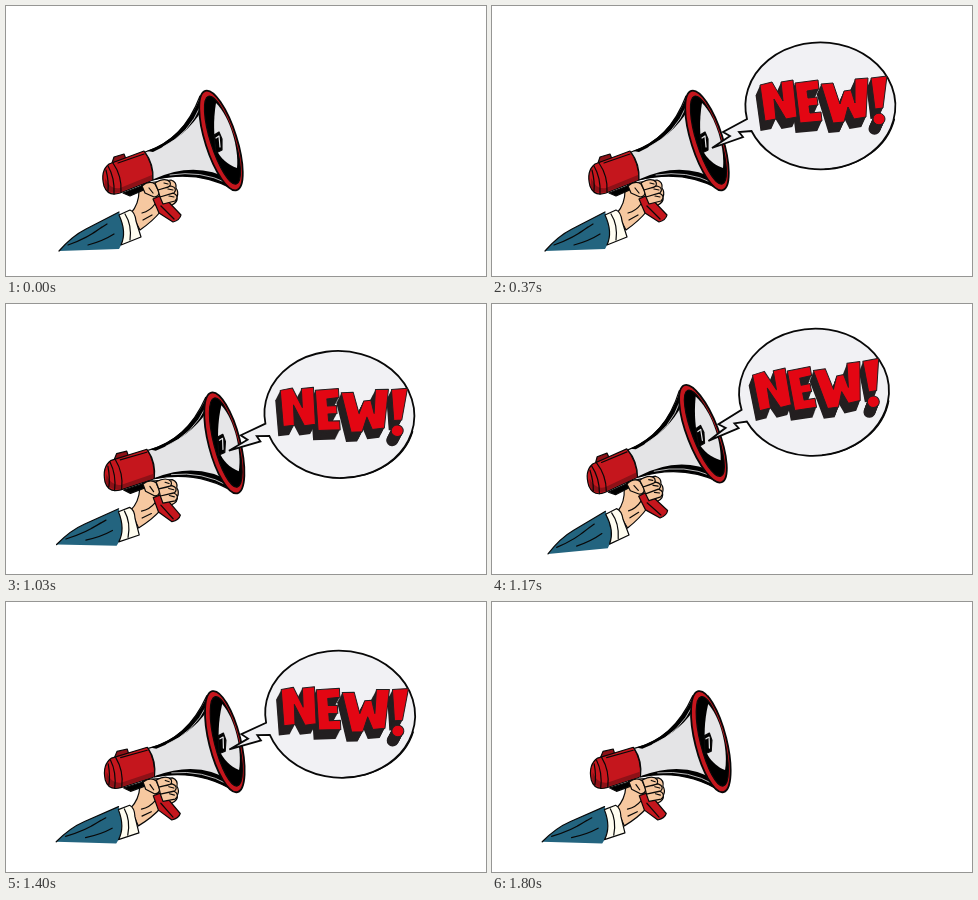
An HTML page for the animation above (1.83 s loop, 480 by 270 pixels).

```html
<!DOCTYPE html>
<html lang="en">
<head>
<meta charset="utf-8">
<title>New!</title>
<style>
  html, body { margin: 0; height: 100%; overflow: hidden; background: #fff; }
  svg { display: block; width: 100vw; height: 100vh; }
  .ink { stroke: #080808; stroke-width: 1.2; stroke-linejoin: round; stroke-linecap: round; }
  .line { fill: none; }
  .red { fill: #c5161d; }
  .dark { fill: #8d1117; }
  .skin { fill: #f6c8a0; }
</style>
</head>
<body>
<svg viewBox="0 0 480 270">
  <defs>
    <path id="word" d="M268 79L280 76 291 95 289 76 301 74 305 111 294 113 282 93 284 113 273 115Z
      M303 77L326 74 327 83 315 85 316 92 325 91 326 99 317 100 318 107 329 106 330 115 308 117Z
      M329 78L341 77 348 98 352 85 359 84 363 97 363 73 376 72 374 111 362 113 356 101 352 116 341 117Z
      M379 72L395 70 391 102 383 103Z M381 113a6 5.8 0 1 1 12 0a6 5.8 0 1 1-12 0Z"/>
  </defs>
  <g id="scene">
    <g class="ink">
      <path fill="#23647f" stroke="none" d="M53 245Q66 230 80 223L113 206 121 228 113 243Z"/>
      <path class="line" d="M53 245Q66 230 80 223L113 206M62 239Q82 232 96 221M82 239Q97 235 108 228M87 227L101 218"/>
      <path class="skin" d="M125 207Q133 198 133 185Q134 178 141 177L165 174Q171 176 170 182 173 186 171 191 172 196 166 199L155 205Q147 215 134 224Z"/>
      <path fill="#fffdf0" d="M113 209L124 204Q129 206 130 215L135 231 115 239Q121 226 113 209Z"/>
      <path class="line" d="M119 208Q126 219 124 234M136 207Q144 205 149 198M137 214L146 209"/>
    </g>
    <g class="ink">
      <path class="red" d="M147 193L156 189 175 209Q174 214 167 216L153 207Z"/>
      <path class="line" d="M155 200L168 213"/>
      <path d="M117 187L138 179 140 183 124 190Z"/>
      <path class="dark" d="M106 157L108 151 118 148 120 153Z"/>
      <path class="red" d="M103 158L138 145Q147 157 147 174L114 187Q102 191 98 180 94 165 103 158Z"/>
      <path class="dark" stroke="none" d="M99 172Q104 184 114 182L146 169 146 174 114 186Q102 189 99 180Z"/>
      <path class="line" d="M102 160Q109 172 108 188M107 157Q116 170 115 186M100 164Q103 176 102 185M112 157L138 148"/>
      <path fill="#e4e4e6" d="M139 146Q177 135 194 90L229 184Q191 163 147 174Q148 158 139 146Z"/>
      <path stroke="none" d="M141 145Q177 132 194 92L196 104Q181 130 147 146ZM148 173Q190 154 225 174L229 184Q191 163 148 174Z"/>
      <path class="line" style="stroke:#e4e4e6;stroke-width:.8" d="M157 141Q183 128 195 99M164 169Q195 164 221 177"/>
      <g transform="rotate(-17.6 215 134.5)">
        <ellipse class="red" cx="215" cy="134.5" rx="15.8" ry="52" style="stroke-width:1.8"/>
        <ellipse cx="216.5" cy="134.5" rx="12" ry="46"/>
      </g>
      <path fill="#e6e6e8" stroke="none" d="M210 97C224 111 233 142 231 162C222 159 214 152 210 143C208 130 207 115 210 97Z"/>
      <path d="M208 129L213 126 216 133 216 144 210 147Z"/>
      <path class="line" style="stroke:#e6e6e8" d="M210 132L213 130 214 141"/>
    </g>
    <g class="ink">
      <path class="skin" d="M136 180Q143 174 149 178L153 186Q153 191 148 191L139 187Z"/>
      <path class="skin" d="M149 177Q159 171 164 176 166 181 159 182L152 184ZM152 184L165 180Q172 182 168 187L154 191ZM154 191L167 187Q174 190 169 195L157 198Z"/>
      <path class="line" d="M158 177L162 178M162 183L167 184M163 190L168 191M143 182L147 187"/>
    </g>
    <g id="bubble">
      <path class="ink" fill="#f1f1f4" style="stroke-width:1.8;stroke-linejoin:miter"
        d="M255 113A75 63.5 0 1 1 259.5 125L247 126 251 131 220 142 238 130 231 126Z"/>
      <path class="ink line" d="M402.5 113A74 62.5 0 0 1 333 163"/>
      <g id="depth" fill="#231f20"></g>
      <use href="#word" fill="#e30613" stroke="#231f20" stroke-linejoin="round"/>
    </g>
  </g>
</svg>
<script>
  const LOOP = 1830;
  const POP = 3, SHAKE = 28, EXIT = 50;
  const popScales = [.25, .6, .95, 1.15, 1.21, 1.17, 1.1, 1.04, 1];
  const exitScales = [.88, .65, .38, .14, 0];
  const angles = [-3.5, -7, -2.5, 3.1, 5.4, 3, -.5, -3.5, -7, -2.5, 3.2, 5.4, 4.8, 4, 3.6];

  const scene = document.getElementById('scene');
  const bubble = document.getElementById('bubble');
  // Block shadow: copies of the word stacked down and to the left
  document.getElementById('depth').innerHTML = Array.from({ length: 10 }, (_, i) =>
    `<use href="#word" x="${(i - 10) * .45}" y="${10 - i}"/>`).join('');

  // Value of a stepped track, holding its last entry
  const at = (track, step) => track[Math.min(step, track.length - 1)];

  function bubbleScale(step) {
    if (step < POP) return 0;
    return step < EXIT ? at(popScales, step - POP) : at(exitScales, step - EXIT);
  }

  function draw() {
    // The motion runs on 30 steps per second
    const step = Math.floor(performance.now() % LOOP * .03 + .12);
    const angle = step < SHAKE ? 0 : at(angles, step - SHAKE);
    const scale = bubbleScale(step);
    scene.setAttribute('transform', `rotate(${angle} 135 198)`);
    bubble.setAttribute('transform', `translate(220 142) scale(${scale}) translate(-220 -142)`);
    bubble.setAttribute('visibility', scale ? 'visible' : 'hidden');
    requestAnimationFrame(draw);
  }
  draw();
</script>
</body>
</html>
```
